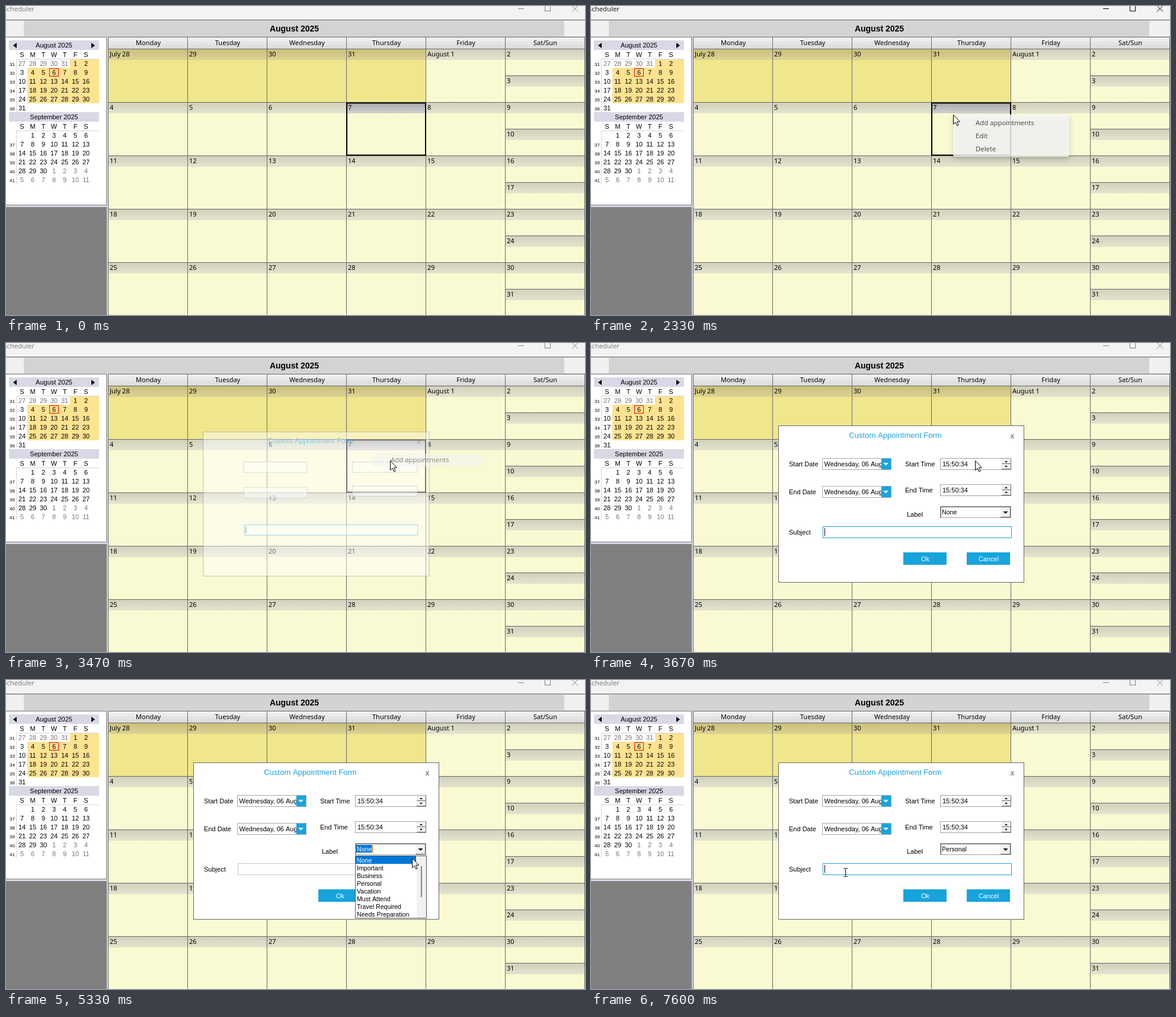
These frames come from a looping animation (977 by 521 pixels, 8 s). An HTML page with a canvas:

```html
<!DOCTYPE html>
<html lang="en">
<head>
<meta charset="utf-8">
<title>Scheduler</title>
<style>
  html, body { margin: 0; width: 100%; height: 100%; overflow: hidden; }
  canvas { display: block; }
</style>
</head>
<body>
<canvas id="stage" width="977" height="521"></canvas>
<script>
const ctx = document.getElementById('stage').getContext('2d');
const LOOP = 8000, STEP = 200 / 3;
const ARIAL = '"Liberation Sans", Arial, sans-serif';
const TAHOMA = '11px "Noto Sans", sans-serif';
const MENU_FONT = '11.4px "Open Sans", sans-serif';
const SMALL = '11px ' + ARIAL, COMBO = '10.6px ' + ARIAL;
const ACCENT = '#17a4dc', SELECT = '#0078d7', LAVENDER = '#d8d8e6';
const LABELS = ['None', 'Important', 'Business', 'Personal', 'Vacation',
  'Must Attend', 'Travel Required', 'Needs Preparation'];

// time, x, y of the pointer tip
const PATH = [
  [200, 985, 525], [267, 962, 508], [467, 638, 342], [933, 638, 342], [1200, 733, 178],
  [1333, 733, 178], [1400, 702, 184], [1667, 630, 190], [2067, 611, 183], [2600, 611, 183],
  [3000, 648, 198], [3867, 648, 198], [4533, 699, 290], [5067, 699, 290],
  [5933, 635, 335], [6000, 634, 337], [6267, 634, 342], [6867, 634, 342], [7400, 429, 324]
];

const clamp = v => Math.max(0, Math.min(1, v));
const smooth = v => v * v * (3 - 2 * v);

function rect(x, y, w, h, color) {
  ctx.fillStyle = color;
  ctx.fillRect(x, y, w, h);
}
function frame(x, y, w, h, color) {
  ctx.lineWidth = 1;
  ctx.strokeStyle = color;
  ctx.strokeRect(x + .5, y + .5, w - 1, h - 1);
}
function text(str, x, y, font, color = '#000', align = 'left') {
  ctx.font = font;
  ctx.fillStyle = color;
  ctx.textAlign = align;
  ctx.fillText(str, x, y);
}
function poly(points, fill, stroke) {
  ctx.beginPath();
  points.forEach(([x, y]) => ctx.lineTo(x, y));
  ctx.closePath();
  if (fill) { ctx.fillStyle = fill; ctx.fill(); }
  if (stroke) { ctx.strokeStyle = stroke; ctx.lineWidth = 1; ctx.stroke(); }
}
function arrow(x, y, half, color, dir = 1) {
  poly([[x - half, y], [x + half, y], [x, y + half * dir]], color);
}
function shade(x, y, w, h, top, bottom) {
  const g = ctx.createLinearGradient(0, y, 0, y + h);
  g.addColorStop(0, top);
  g.addColorStop(1, bottom);
  rect(x, y, w, h, g);
}

function titleBar(active) {
  const ink = active ? '#000' : '#858585';
  rect(0, 0, 977, 23, '#f3f3f3');
  text('Scheduler', 48, 9, MENU_FONT, active ? '#111' : '#777', 'right');
  rect(864, 4, 10, 1, ink);
  frame(909, -1, 10, 10, ink);
  ctx.beginPath();
  ctx.moveTo(955, -.5); ctx.lineTo(965, 9.5);
  ctx.moveTo(965, -.5); ctx.lineTo(955, 9.5);
  ctx.stroke();
  rect(0, 23, 977, 1, '#696969');
  rect(0, 24, 977, 28, '#d3d3d3');
  rect(0, 25, 30, 26, '#f0f0f0');
  rect(942, 25, 35, 26, '#f0f0f0');
  text('August 2025', 486.5, 43, 'bold 14px ' + ARIAL, '#000', 'center');
}

// One month of the navigator; `first` is the month's day shown at the top left (may be below 1)
function month(name, top, first, length, rows, previous, firstWeek, weekRow) {
  rect(5, top, 152, 16, LAVENDER);
  text(name, 81, top + 12, SMALL, '#000', 'center');
  [...'SMTWTFS'].forEach((d, i) => text(d, 27 + 18 * i, top + 28, SMALL, '#000', 'center'));
  rect(18, top + 31, 139, 1, '#d4d4de');
  rect(17, top + 31, 1, rows * 15, '#d4d4de');
  for (let r = 0; r < rows; r++) {
    const y = top + 43 + 15 * r;
    if (r >= weekRow) text(firstWeek + r - weekRow, 10.5, y, '8px ' + ARIAL, '#000', 'center');
    for (let c = 0; c < 7; c++) {
      const day = first + r * 7 + c;
      const outside = day < 1 || day > length;
      const shown = day < 1 ? day + previous : day > length ? day - length : day;
      if (day < 1 && !previous || day > length && previous) continue;
      text(shown, 27 + 18 * c, y, SMALL, outside ? '#74747e' : '#000', 'center');
    }
  }
}

function navigator() {
  rect(0, 52, 173, 469, LAVENDER);
  rect(0, 52, 170, 284, '#808080');
  rect(0, 53, 169, 282, '#fff');
  rect(0, 339, 170, 182, '#808080');
  rect(108, 90, 49, 15, '#fee391');
  rect(36, 104, 121, 60, '#fee391');
  month('August 2025', 58, -4, 31, 6, 31, 31, 0);
  month('September 2025', 179, 0, 30, 6, 0, 37, 1);
  poly([[12, 66.5], [18, 62], [18, 71]], '#000');
  poly([[150, 66.5], [144, 62], [144, 71]], '#000');
  frame(73, 105, 16, 14, '#f00');
}

function dayCell(x, y, h, offset) {
  const july = offset < 4, selected = offset === 10;
  const day = offset - 3;
  rect(x, y, 133, h, july ? '#f0e68c' : '#fafad2');
  if (selected) shade(x, y, 133, 18, '#a6a6a8', '#d2d2d2');
  else if (july) shade(x, y, 133, 18, '#cac07b', '#dcd394');
  else shade(x, y, 133, 18, '#d0d0bc', '#e4e4ce');
  const label = july ? (offset ? 28 + offset : 'July 28') : day === 1 ? 'August 1' : day;
  text(label, x + 2, y + 12, TAHOMA);
}

function calendar() {
  rect(172, 52, 805, 469, '#696969');
  ['Monday', 'Tuesday', 'Wednesday', 'Thursday', 'Friday', 'Sat/Sun'].forEach((name, c) => {
    const x = 173 + 134 * c;
    shade(x, 53, 133, 19, '#f2f2f2', '#d9d9d9');
    text(name, x + 67, 66, TAHOMA, '#000', 'center');
    for (let r = 0; r < 5; r++) {
      const y = 73 + 90 * r, offset = r * 7 + c;
      if (c < 5) dayCell(x, y, 89, offset);
      else {
        dayCell(x, y, 44, offset);
        dayCell(x, y + 45, 44, offset + 1);
      }
    }
  });
  ctx.strokeStyle = '#000';
  ctx.lineWidth = 2;
  ctx.strokeRect(575, 163.5, 133, 88);
}

function menuItem(name, row) {
  text(name, 649, 201 + 22 * row, MENU_FONT, '#1c1c1c');
}
function contextMenu(t) {
  if (t < 2260 || t > 3390) return;
  ctx.save();
  ctx.globalAlpha = clamp((t - 2210) / 150);
  ctx.shadowColor = 'rgba(0,0,0,.22)';
  ctx.shadowBlur = 8;
  ctx.shadowOffsetY = 4;
  ctx.beginPath();
  ctx.roundRect(611, 183, 196, 71, 4);
  ctx.fillStyle = '#f9f9f9';
  ctx.fill();
  ctx.shadowColor = 'transparent';
  if (t > 2790) rect(617, 187, 187, 21, '#f2f2f3');
  ['Add appointments', 'Edit', 'Delete'].forEach(menuItem);
  ctx.restore();
}
function fadingItem(t) {
  if (t < 3390 || t > 3600) return;
  ctx.save();
  ctx.globalAlpha = clamp(1 - (t - 3370) / 200);
  rect(617, 187, 187, 21, '#f2f2f3');
  menuItem('Add appointments', 0);
  ctx.restore();
}

function dateBox(y, filled) {
  rect(390, y, 117, 20, '#fff');
  frame(390, y, 117, 20, '#a8a8a8');
  if (!filled) return;
  ctx.save();
  ctx.beginPath();
  ctx.rect(391, y, 99, 20);
  ctx.clip();
  text('Wednesday, 06 Aug', 393.5, y + 14, SMALL);
  ctx.restore();
  rect(490, y + 1, 16, 18, ACCENT);
  arrow(497.5, y + 8, 4.5, '#fff');
}
function raised(x, y, w, h) {
  rect(x, y, w, h, '#f0f0f0');
  rect(x, y + h - 1, w, 1, '#696969');
  rect(x + w - 1, y, 1, h, '#696969');
}
function timeBox(y, filled) {
  rect(589, y, 120, 20, '#fff');
  frame(589, y, 120, 20, '#a0a0a0');
  if (!filled) return;
  text('15:50:34', 593, y + 14, SMALL);
  raised(693, y + 1, 16, 9);
  raised(693, y + 10, 16, 9);
  arrow(700.5, y + 7, 2.5, '#000', -1);
  arrow(700.5, y + 13, 2.5, '#000');
}
function combo(t) {
  const chosen = t > 6720 ? 'Personal' : 'None';
  const focused = t > 4660 && t < 7590;
  const pressed = t > 4660 && t < 4880;
  rect(589, 275, 120, 20, '#fff');
  frame(589, 275, 120, 20, '#a0a0a0');
  rect(590, 276, 118, 1, '#696969');
  rect(590, 276, 1, 18, '#696969');
  raised(691, 277, 17, 17);
  if (pressed) frame(691, 277, 17, 17, '#a0a0a0');
  arrow(699.5 + pressed, 284 + pressed, 4, '#000');
  ctx.font = COMBO;
  const width = ctx.measureText(chosen).width;
  if (focused) {
    rect(591, 278, width + 2, 13, SELECT);
    const blinkOff = t > 5400 && t < 5930 || t > 6460 && t < 6720 || t > 7190;
    if (!blinkOff) rect(Math.round(592 + width), 278, 2, 13, '#f08a28');
  }
  text(chosen, 592, 289, COMBO, focused ? '#fff' : '#000');
}
function dropDown(t, pointer) {
  if (t < 4660 || t > 6720) return;
  const shift = 106 * (clamp((t - 4655) / 200) - 1);
  let hover = 0;
  if (pointer.y >= 297 && pointer.x < 693) hover = Math.floor((pointer.y - 297) / 13);
  ctx.save();
  ctx.beginPath();
  ctx.rect(589, 296, 121, 106);
  ctx.clip();
  ctx.translate(0, shift);
  rect(589, 296, 121, 106, '#fff');
  rect(693, 297, 16, 104, '#f0f0f0');
  rect(700, 314, 2, 52, '#858585');
  LABELS.forEach((name, i) => {
    const on = i === hover;
    if (on) rect(590, 297 + 13 * i, 102, 13, SELECT);
    text(name, 592, 308 + 13 * i, COMBO, on ? '#fff' : '#000');
  });
  frame(589, 296, 121, 106, '#555');
  ctx.restore();
}
function button(x, name) {
  rect(x, 353, 73, 21, ACCENT);
  text(name, x + 37, 368, SMALL, '#fff', 'center');
}
function subjectBox(t) {
  const focused = t < 4660 || t > 7590;
  rect(391, 309, 319, 20, '#fff');
  frame(391, 309, 319, 20, focused ? ACCENT : '#c8c8c8');
  const blinkOff = t > 3990 && t < 4520;
  if (focused && !blinkOff) rect(394, 312, 1, 13, '#000');
}

function dialog(t, pointer) {
  if (t < 3390) return;
  const progress = clamp((t - 3390) / 260);
  const scale = t < 3460 ? .9 : 1 - .1 * (1 - smooth(progress));
  const filled = t > 3525;
  ctx.save();
  ctx.globalAlpha = t < 3460 ? .15 : clamp(.45 + (t - 3466) / 360);
  ctx.translate(523.5, 271.5);
  ctx.scale(scale, scale);
  ctx.translate(-523.5, -271.5);
  rect(316, 139, 415, 265, '#fff');
  frame(316, 139, 415, 265, '#696969');
  text('Custom Appointment Form', 513.5, 160, '13.1px ' + ARIAL, ACCENT, 'center');
  text('x', 711, 161, 'bold 12.5px ' + ARIAL, '#808080', 'center');
  dateBox(194, filled);
  dateBox(241, filled);
  timeBox(194, filled);
  timeBox(238, filled);
  subjectBox(t);
  if (filled) {
    [['Start Date', 334, 208], ['End Date', 334, 255], ['Start Time', 530, 208],
     ['End Time', 530, 252], ['Label', 533, 293], ['Subject', 334, 323]]
      .forEach(([name, x, y]) => text(name, x, y, SMALL));
    button(527, 'Ok');
    button(634, 'Cancel');
    combo(t);
    dropDown(t, pointer);
  }
  ctx.restore();
}

function pointerAt(t) {
  const next = PATH.findIndex(key => key[0] > t);
  if (next === 0) return { x: PATH[0][1], y: PATH[0][2] };
  const a = PATH[next < 0 ? PATH.length - 1 : next - 1];
  const b = next < 0 ? a : PATH[next];
  const k = next < 0 ? 0 : smooth((t - a[0]) / (b[0] - a[0]));
  return { x: Math.round(a[1] + (b[1] - a[1]) * k), y: Math.round(a[2] + (b[2] - a[2]) * k) };
}
function drawPointer(t, { x, y }) {
  if (t < 260) return;
  if (t > 6900 && y < 329) {
    rect(x, y - 6, 1, 13, '#000');
    [-7, 7].forEach(d => {
      rect(x - 3, y + d, 3, 1, '#000');
      rect(x + 1, y + d, 3, 1, '#000');
    });
    return;
  }
  const shape = [[0, 0], [0, 16], [3.7, 12.6], [6.2, 18.3], [8.6, 17.3], [6.2, 11.6], [11, 11.6]];
  poly(shape.map(([px, py]) => [x + .5 + px, y + .5 + py]), '#fff', '#000');
}

function draw(now) {
  const elapsed = now % LOOP;
  // The screen refreshes in fixed steps of 1/15 s
  const t = Math.floor((elapsed + 4) / STEP) * STEP;
  const pointer = pointerAt(t + .5);
  titleBar(t > 2120 && t < 3390);
  navigator();
  calendar();
  contextMenu(t);
  dialog(t, pointer);
  fadingItem(t);
  drawPointer(t, pointer);
}

const start = performance.now();
function tick() {
  draw(performance.now() - start);
  requestAnimationFrame(tick);
}
tick();
</script>
</body>
</html>
```
